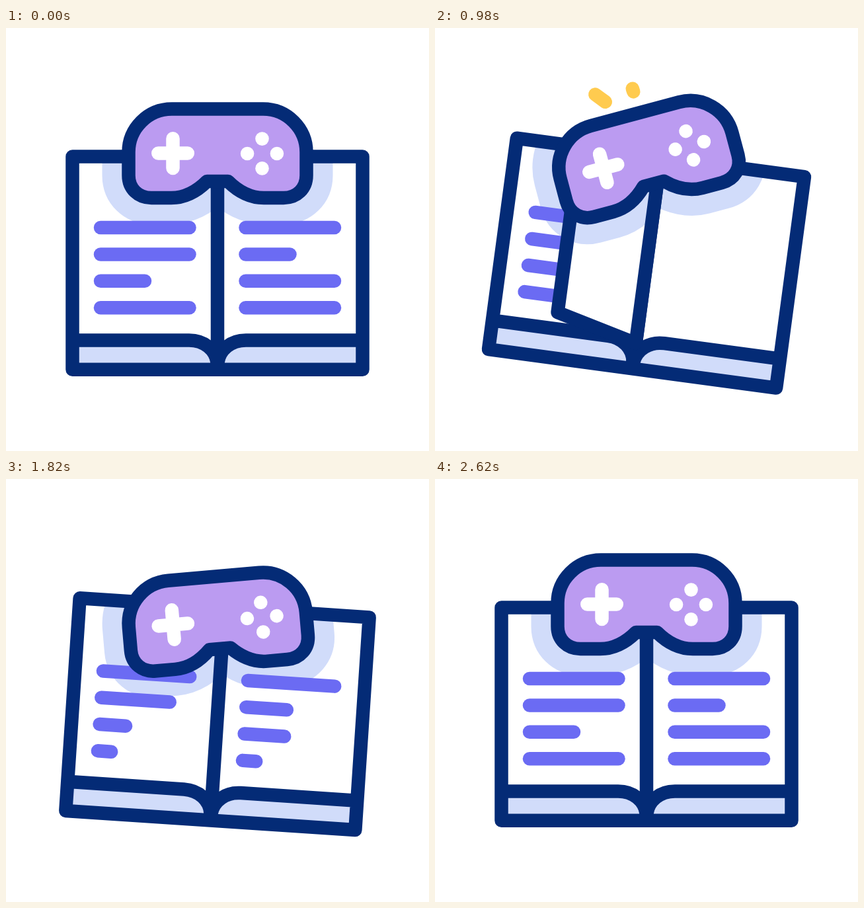
These frames come from a looping animation (640x640 px, 3 s). An HTML page with a canvas:

```html
<!DOCTYPE html>
<html lang="en">
<head>
<meta charset="utf-8">
<title>Game book</title>
<style>
  html, body { margin: 0; width: 100%; height: 100%; overflow: hidden; background: #fff; }
  canvas { display: block; }
</style>
</head>
<body>
<canvas id="stage" width="640" height="640"></canvas>
<script>
const ctx = document.getElementById('stage').getContext('2d');
const NAVY = '#042b76', PURPLE = '#bb9bf1', TEXT = '#6b6bf3', SHADE = '#d1dcfa', YELLOW = '#ffcb4f';
const LOOP = 3000, LINE = 20.5, MID = 320, PAGE = 219.5, TOP = 194.5, BOTTOM = 472.5;

const progress = (t, from, to) => Math.min(1, Math.max(0, (t - from) / (to - from)));
const span = (t, from, to) => {
  const u = progress(t, from, to);
  return u * u * (3 - 2 * u);
};

// Eases through [time, value] keys.
const keyed = (t, ...keys) => keys.reduce((value, [time, target], i) =>
  i ? value + (target - keys[i - 1][1]) * span(t, keys[i - 1][0], time) : target, 0);

const bookTilt = t => keyed(t, ...[0, 12, -8, 7, 0].map((angle, i) => [200 + 600 * i, angle]));
const padTilt = t => keyed(t, [200, 0], [620, -15], [970, -15], [1440, 15], [1820, -5], [2460, 0]);
const padY = t => keyed(t, [200, 0], [700, 25], [1320, -21], [1820, 25], [2360, 0]);

// The path together with its mirror image across the spine.
function mirrored(data) {
  const half = new Path2D(data), whole = new Path2D(half);
  whole.addPath(half, new DOMMatrix([-1, 0, 0, 1, 2 * MID, 0]));
  return whole;
}

const fold = `M100.5 ${BOTTOM}H277C300 ${BOTTOM} 317 487 319.5 506`;
const paperArea = new Path2D(`M100.5 ${TOP}h${2 * PAGE}V${BOTTOM}h${-2 * PAGE}Z`);
const cover = mirrored(`M${MID} ${TOP}H100.5V516.8H${MID}Z${fold}`);
const edges = mirrored(fold + 'V512H100.5Z');
const pad = new Path2D('M251 122.5H389Q454.5 122.5 454.5 188V223C454.5 243 440 257 420 257H390' +
  'C369 257 350 246 336 232H304C290 246 271 257 250 257H220C200 257 185.5 243 185.5 223V188' +
  'A65.5 65.5 0 0 1 251 122.5Z'.replace('A', 'A').trim());
const padShape = new Path2D('M251 122.5H389A65.5 65.5 0 0 1 454.5 188V223C454.5 243 440 257 420 257H390' +
  'C369 257 350 246 336 232H304C290 246 271 257 250 257H220C200 257 185.5 243 185.5 223V188' +
  'A65.5 65.5 0 0 1 251 122.5Z');
const cross = new Path2D('M230.3 189.6h44.5M252.5 167.3v44.6');

function group(draw) {
  ctx.save();
  draw();
  ctx.restore();
}

function spin(degrees, x, y) {
  ctx.translate(x, y);
  ctx.rotate(degrees * Math.PI / 180);
  ctx.translate(-x, -y);
}

function fill(path, color) {
  ctx.fillStyle = color;
  ctx.fill(path);
}

function stroke(path, color, width = LINE) {
  ctx.strokeStyle = color;
  ctx.lineWidth = width;
  ctx.stroke(path);
}

const segment = (x1, y1, x2, y2, color) => stroke(new Path2D(`M${x1} ${y1}L${x2} ${y2}`), color);

function placePad(t) {
  ctx.translate(0, padY(t));
  spin(padTilt(t), MID, 189.75);
}

const tiltBook = t => spin(bookTilt(t), MID, 355.5);

function paper(area, t) {
  group(() => {
    tiltBook(t);
    fill(area, '#fff');
    ctx.clip(area);
    ctx.setTransform(1, 0, 0, 1, 0, 0);
    placePad(t);
    fill(padShape, SHADE);
    stroke(padShape, SHADE, 80);
  });
}

// Four lines on page 0 or 1; shown(row, isShort) is the written part of each.
function text(page, shown) {
  for (let row = 0; row < 4; row++) {
    const isShort = row === 2 - page;
    const x = 143 + PAGE * page, y = 302 + 40.4 * row;
    const part = shown(row, isShort);
    if (part > 0) segment(x, y, x + (isShort ? 67 : 134.5) * part, y, TEXT);
  }
}

const oldText = page => text(page, () => 1);

function newText(page, t) {
  text(page, (row, isShort) => {
    const start = 1000 + 200 * row;
    return span(t, start, start + (isShort ? 750 : 900));
  });
}

// k runs from 1 (flat on the right) to -1 (flat on the left).
function turningPage(t, k) {
  const lift = 57 * (1 - Math.abs(k)), x = MID + PAGE * k;
  const sheet = new Path2D(`M${MID} ${TOP}L${x} ${TOP - lift}V${BOTTOM - lift}L${MID} 478Z`);
  paper(sheet, t);
  group(() => {
    tiltBook(t);
    if (k > 0) group(() => {
      const skew = lift / PAGE;
      ctx.transform(k, -skew, 0, 1, MID * (1 - k), MID * skew);
      oldText(1);
    });
    stroke(sheet, NAVY);
  });
}

function drawBook(t) {
  const turn = progress(t, 200, 1200);
  paper(paperArea, t);
  group(() => {
    tiltBook(t);
    if (turn < 1) oldText(0);
    if (turn === 0) oldText(1);
    fill(edges, SHADE);
    stroke(cover, NAVY);
  });
  if (turn > 0 && turn < 1) turningPage(t, 1 - 2 * turn);
  group(() => {
    tiltBook(t);
    newText(0, t);
    newText(1, t);
  });
}

// A fan of four sparks, fired from left to right.
function drawSparks(t) {
  for (let i = 0; i < 4; i++) {
    const angle = Math.PI * (i + 1) / 5, start = 835 + 100 * i;
    const dx = -Math.cos(angle), dy = -Math.sin(angle);
    const inner = 98 + 36 * dy, outer = 78 - 66 * dy;
    const head = span(t, start, start + 300), tail = span(t, start + 156, start + 456);
    if (head === 0 || tail === 1) continue;
    const [from, to] = [tail, head].map(u => inner + (outer - inner) * u);
    segment(MID + dx * from, 157 + dy * from, MID + dx * to, 157 + dy * to, YELLOW);
  }
}

function drawPad(t) {
  group(() => {
    placePad(t);
    fill(padShape, PURPLE);
    stroke(padShape, NAVY);
    stroke(cross, '#fff');
    for (let i = 0; i < 4; i++) {
      const angle = i * Math.PI / 2, dot = new Path2D();
      dot.arc(387.5 + 22.4 * Math.cos(angle), 190 + 22.4 * Math.sin(angle), 10.3, 0, 7);
      fill(dot, '#fff');
    }
  });
}

function frame(now) {
  const t = now % LOOP;
  ctx.clearRect(0, 0, 640, 640);
  ctx.lineCap = ctx.lineJoin = 'round';
  drawBook(t);
  drawSparks(t);
  drawPad(t);
  requestAnimationFrame(frame);
}
requestAnimationFrame(frame);
</script>
</body>
</html>
```
